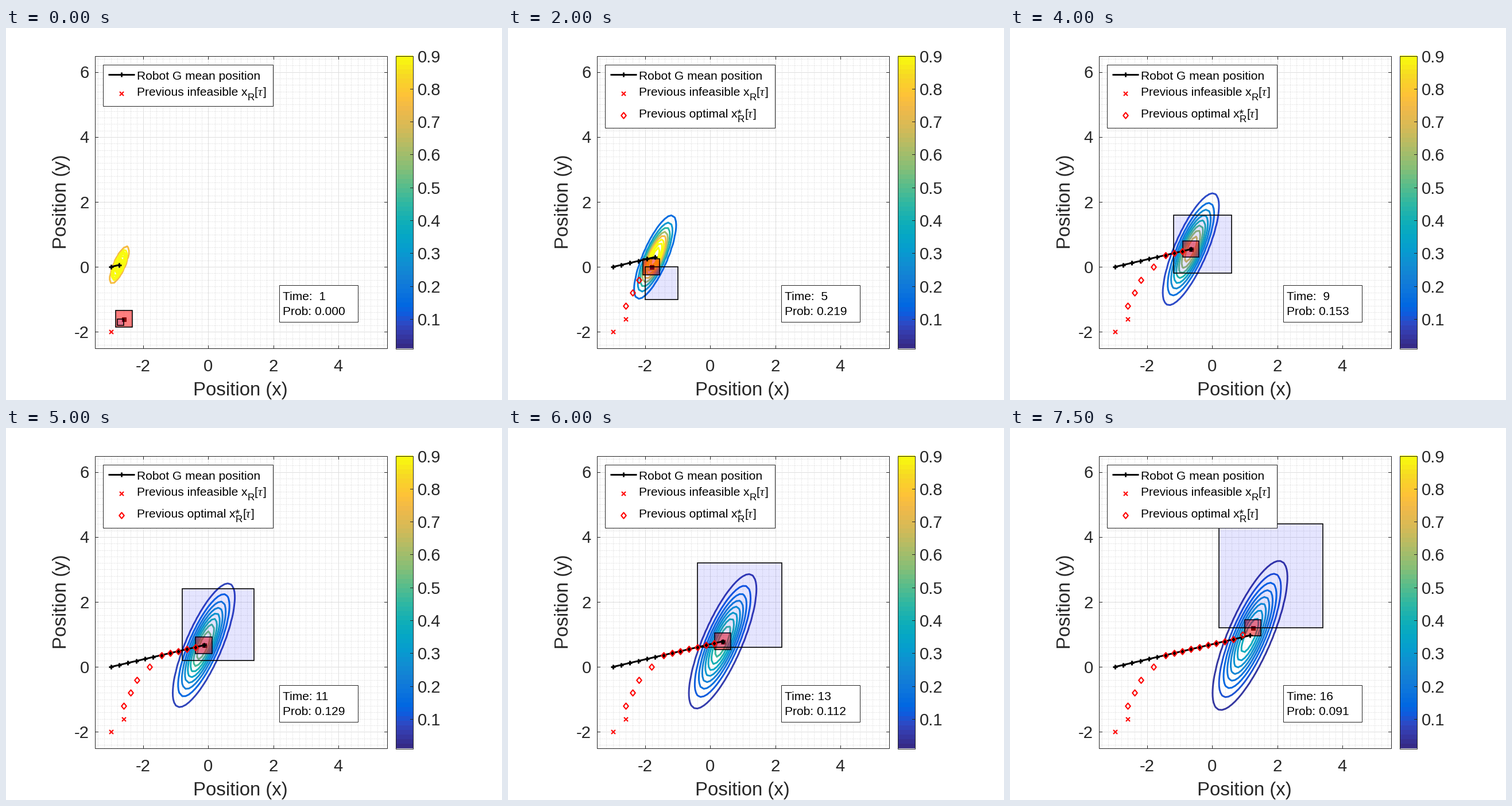
Write a matplotlib script that moves like this. It is 864 px wide and 648 px high and loops after 8000 ms.

```python
import matplotlib.pyplot as plt
import numpy as np
from matplotlib.animation import FuncAnimation
from matplotlib.colors import LinearSegmentedColormap
from matplotlib.patches import Rectangle
from matplotlib.path import Path

plt.rcParams["font.family"] = "Liberation Sans"
W, H = 864, 648
STEPS = 16
UNIT = 509 / 9                       # pixels per data unit
LEFT, RIGHT, TOP, BOTTOM = 154.5, 663.5, 48.5, 557.5
INK = "#262626"

# colour stops: row out of 64, r, g, b
STOPS = [
    (1, .208, .166, .529), (4, .208, .239, .677), (6, .171, .292, .779),
    (8, .059, .360, .868), (10, .006, .409, .883), (13, .050, .459, .864),
    (16, .078, .504, .838), (19, .064, .557, .824), (22, .027, .614, .814),
    (25, .023, .654, .777), (28, .059, .684, .725), (32, .180, .718, .642),
    (36, .348, .742, .547), (40, .530, .749, .466), (48, .819, .733, .350),
    (53, .945, .726, .289), (56, .999, .765, .216), (60, .970, .848, .148),
    (64, .976, .983, .054),
]
CMAP = LinearSegmentedColormap.from_list(
    "heat", [((s[0] - 1) / 63, s[1:]) for s in STOPS], N=64)
DIAMOND = Path([(0, 1), (.82, 0), (0, -1), (-.82, 0), (0, 1)], closed=True)

# spread of the density after one step, correlation of x and y
RHO = .78
SX, SY = np.array([.288, .574]) / np.sqrt(2 * np.log(9))
PROB = [0, .001, .041, .155, .219, .213, .188, .169, .153, .140,
        .129, .120, .112, .105, .099, .091]


def px(x):
    return LEFT + (np.asarray(x) + 3.5) * UNIT


def py(y):
    return BOTTOM - (np.asarray(y) + 2.5) * UNIT


def mean(t):
    return -3 + .26 * t, .0605 * t


def robot(t):
    """Best reachable point at step t."""
    if t < 2:
        return -3 + .4 * t, -2 + .4 * t
    if t < 5:
        return -3 + .2 * t, -2 + .4 * t
    mx, my = mean(t)
    y = np.clip(my, -2 + .2 * t, -2 + .4 * t)
    return mx + RHO * SX / SY * (y - my), y


fig = plt.figure(figsize=(W / 72, H / 72), dpi=72, facecolor="white")
ax = fig.add_axes([0, 0, 1, 1])
ax.axis("off")


def line(x, y, color, lw=1, **kw):
    return ax.plot(x, y, color=color, lw=lw, **kw)[0]


def text(x, y, s, size=21, color="black", z=12, **kw):
    kw.setdefault("va", "baseline")
    return ax.text(x, y, s, fontsize=size, color=color, zorder=z, **kw)


def box(x0, y0, x1, y1, face, edge, lw=1, z=10):
    return ax.add_patch(Rectangle((x0, y0), x1 - x0, y1 - y0, fc=face,
                                  ec=edge, lw=lw, zorder=z))


def marks(points, kind, z=8):
    """Red crosses or diamonds at pixel positions."""
    xs, ys = zip(*points)
    shape, size = ("x", 7) if kind == "cross" else (DIAMOND, 10.5)
    return line(xs, ys, "red", 0, ls="none", marker=shape, ms=size, mew=2.1,
                mfc="none", mec="red", zorder=z)


def track(xs, ys, z=7):
    return line(xs, ys, "black", 3, marker="+", ms=7.5, mew=3, zorder=z,
                solid_capstyle="butt")


def symbol(x, y, star=False):
    """x_R[tau] with an optional star."""
    parts = [text(x, y, "x"), text(x + 10.5, y + 9, "R", 17),
             text(x + 23, y, "["),
             text(x + 29, y, "τ", family="Liberation Serif", style="italic"),
             text(x + 38, y, "]")]
    if star:
        parts.append(text(x + 10, y, "*"))
    return parts


def draw_axes():
    for k in range(-17, 33):
        v = k / 5
        major = k % 10 == 0
        style = dict(color="#dedede" if major else "#d0d0d0",
                     ls="-" if major else (0, (1, 2)),
                     zorder=2 if major else 1)
        if v < 5.5:
            line([px(v)] * 2, [TOP, BOTTOM], **style)
        if v > -2.5:
            line([LEFT, RIGHT], [py(v)] * 2, **style)
    for v in (-2, 0, 2, 4, 6):
        x, y = px(v), py(v)
        for edge, d in ((LEFT, 5), (RIGHT, -5)):
            line([edge, edge + d], [y, y], INK, zorder=9)
        text(145, y + 10.5, str(v), 29.3, INK, ha="right")
        if v < 6:
            for edge, d in ((TOP, 5), (BOTTOM, -5)):
                line([x, x], [edge, edge + d], INK, zorder=9)
            text(x - (v < 0), 597.5, str(v), 29.3, INK, ha="center")
    box(LEFT, TOP, RIGHT, BOTTOM, "none", INK, z=9)
    text(408.5, 640, "Position (x)", 33, INK, ha="center")
    text(112.5, 303, "Position (y)", 33, INK, rotation=90, ha="right",
         va="center")


def draw_colorbar():
    ax.imshow(np.linspace(1, 0, 64)[:, None], cmap=CMAP, aspect="auto",
              extent=(678.5, 708.5, 558.5, 48.5), interpolation="nearest")
    box(678.5, 48.5, 708.5, 558.5, "none", INK)
    for k in range(1, 10):
        y = 48.5 + (.9 - k / 10) / .89 * 510
        line([704, 708.5], [y, y], INK, zorder=11)
        text(717, y + 11, f"{k / 10:.1f}", 29.3, INK)


def draw_legend():
    frame = box(168.5, 63.5, 464.5, 135.5, "white", INK)
    line([178, 224], [80.5, 80.5], "black", 3, zorder=11,
         solid_capstyle="butt")
    track([200.5], [80.5], 11)
    text(228, 89.5, "Robot G mean position")
    marks([(200.5, 113.5)], "cross", 11)
    text(228, 117.5, "Previous infeasible")
    symbol(410, 117.5)
    extra = [marks([(200.5, 151.5)], "diamond", 11),
             text(228, 155.5, "Previous optimal"),
             *symbol(389, 155.5, star=True)]
    return frame, extra


draw_axes()
draw_colorbar()
legend, optimal_row = draw_legend()
box(475.5, 447.5, 612.5, 511.5, "white", INK)
time_label = text(482.5, 473.5, "")
prob_label = text(482.5, 500, "")

grid = np.linspace(-3.5, 5.5, 91)
GX, GY = np.meshgrid(grid, grid + 1)
moving = []


def density(t):
    mx, my = mean(t)
    u = (GX - mx) / (SX * np.sqrt(t))
    v = (GY - my) / (SY * np.sqrt(t))
    k = 1 - RHO ** 2
    peak = 1 / (2 * np.pi * SX * SY * t * np.sqrt(k))
    return peak, peak * np.exp(-(u * u - 2 * RHO * u * v + v * v) / (2 * k))


def update(i):
    t = i + 1
    while moving:
        moving.pop().remove()

    peak, z = density(t)
    moving.append(ax.contour(px(GX), py(GY), z,
                             levels=peak * np.arange(1, 9) / 9, cmap=CMAP,
                             vmin=.01, vmax=.9, linewidths=3, zorder=3))

    rx, ry = robot(t)
    moving.append(line([px(rx)], [py(ry)], "black", 0, marker="s", ms=7,
                       mew=1, zorder=4))
    moving.append(box(px(rx - .25), py(ry + .25), px(rx + .25), py(ry - .25),
                      (1, 0, 0, .5), "black", 1.6, 5))
    x0, y0, size = -3 + .2 * t, -2 + .2 * t, .2 * t
    moving.append(box(px(x0), py(y0 + size), px(x0 + size), py(y0),
                      (0, 0, 1, .1), "black", 1.6, 6))

    mx, my = mean(np.arange(t + 1))
    moving.append(track(px(mx), py(my)))
    past = [(px(x), py(y)) for x, y in map(robot, range(t))]
    moving.append(marks(past[:2], "cross"))
    if t > 2:
        moving.append(marks(past[2:], "diamond"))

    legend.set_height(110 if t > 2 else 72)
    for part in optimal_row:
        part.set_visible(t > 2)
    time_label.set_text(f"Time: {t:2d}")
    prob_label.set_text(f"Prob: {PROB[i]:.3f}")
    ax.set_xlim(0, W)
    ax.set_ylim(H, 0)
    return []


anim = FuncAnimation(fig, update, frames=STEPS, interval=500, repeat=True,
                     repeat_delay=0, blit=False)
plt.show()
```
